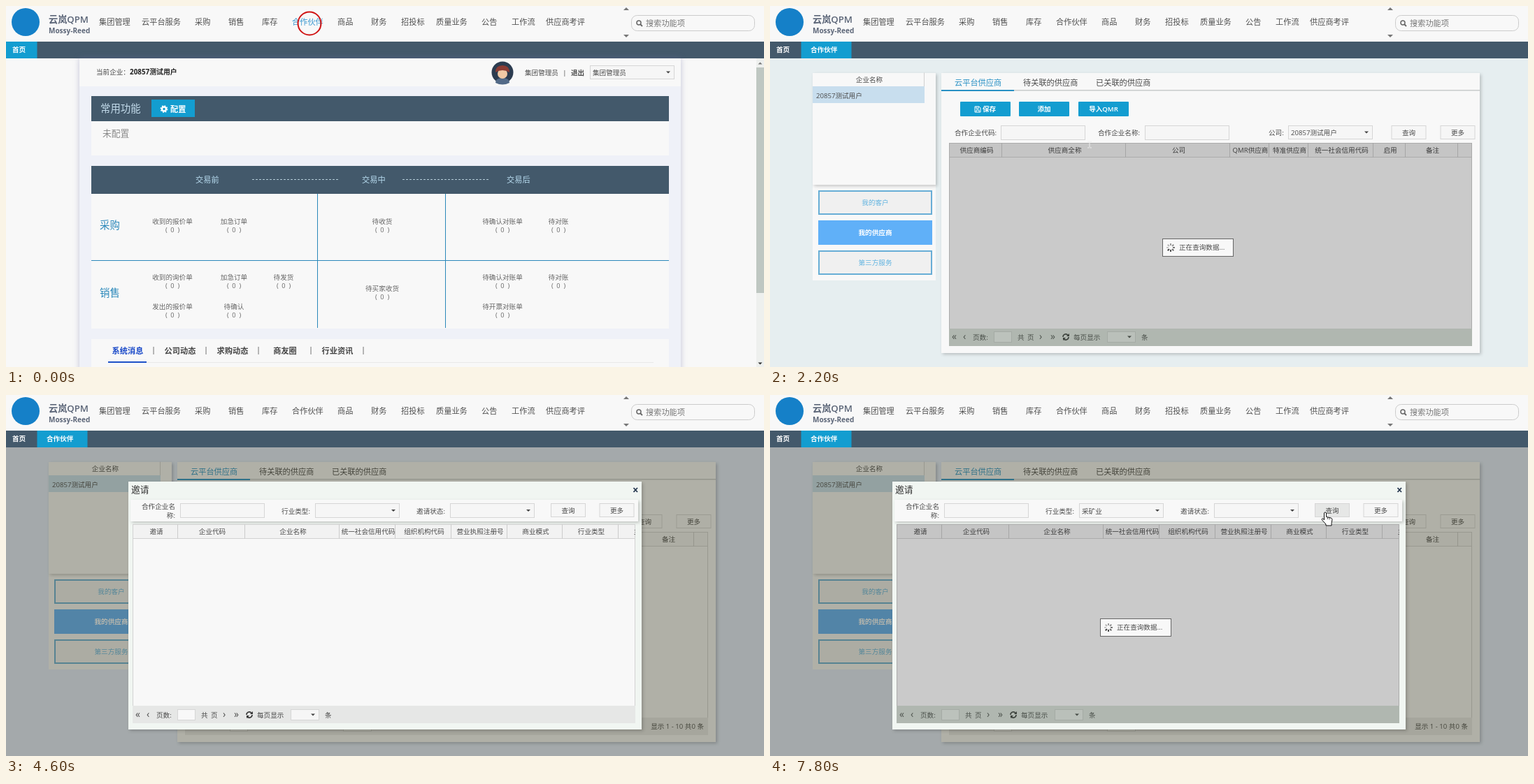
Write an HTML page that moves like this. It is 1084x517 px and loops after 8 s.

```html
<!DOCTYPE html>
<html lang="zh-CN">
<head>
<meta charset="utf-8">
<style>
html, body { margin: 0; height: 100%; overflow: hidden; background: #f8f8f8 }
#stage { display: block; width: 100vw; height: 100vh; font-family: 'Open Sans', 'Noto Sans CJK SC', 'Noto Sans CJK', sans-serif }
.shadow { filter: drop-shadow(2px 2px 2px #0003) }
</style>
</head>
<body>
<svg id="stage" viewBox="0 0 1084 517"></svg>
<script>
const LOOP = 8000, STEP = 200;
const PAPER = '#f8f8f8', BAR = '#43596b', BLUE = '#139dd0', INK = '#4a4a4a';
const ACCOUNT = '20857测试用户';

const rect = (x, y, w, h, fill, extra = '') =>
  `<rect x="${x}" y="${y}" width="${w}" height="${h}" fill="${fill}" ${extra}/>`;
const box = (x, y, w, h, fill = '#f6f6f6', stroke = '#d6d6d6', width = 1, extra = '') =>
  rect(x + width / 2, y + width / 2, w - width, h - width, fill, `stroke="${stroke}" stroke-width="${width}" ${extra}`);
const path = (d, fill, extra = '') => `<path d="${d}" fill="${fill}" ${extra}/>`;
const line = (d, stroke, width = 1, extra = '') => path(d, 'none', `stroke="${stroke}" stroke-width="${width}" ${extra}`);
const circle = (x, y, r, fill, extra = '') => `<circle cx="${x}" cy="${y}" r="${r}" fill="${fill}" ${extra}/>`;
const text = (x, y, s, size = 9.6, fill = INK, extra = '') =>
  `<text x="${x}" y="${y}" dy=".37em" font-size="${size}" fill="${fill}" ${extra}>${s}</text>`;
const MID = 'text-anchor="middle"', END = 'text-anchor="end"', BOLD = 'font-weight="600"';
const mid = (x, y, s, size, fill, extra = '') => text(x, y, s, size, fill, MID + ' ' + extra);
const group = (id, ...parts) => `<g id="${id}">${parts.join('')}</g>`;
const caret = (x, y, fill = '#444', dir = 1, r = 3) =>
  path(`M${x - r} ${y - dir * r / 2}h${2 * r}l${-r} ${dir * r}z`, fill);
const select = (x, y, w, h, s = '') => box(x, y, w, h) + text(x + 4, y + h / 2, s) + caret(x + w - 9, y + h / 2);
const button = (x, y, s) => box(x, y, 50, 20) + mid(x + 25, y + 10, s);
const solid = (x, s) => rect(x, 137, 72, 21, BLUE, 'rx="1"') + mid(x + 36, 147.5, s, 9.6, '#fff', BOLD);

function scrollbar(x, y, w, h, thumb) {
  return rect(x, y, w, h, '#eef0ee') + rect(x, y + 13, w, thumb, '#bfc7c2') +
    caret(x + w / 2, y + 7, '#777', -1) + caret(x + w / 2, y + h - 5, '#333');
}

function grid(x, y, w, h, cols, labels) {
  let out = box(x, y, w, h, PAPER, '#d2d2d2') + box(x, y, w, 21, '#f2f2f2', '#d2d2d2');
  labels.forEach((label, i) => {
    out += mid((cols[i] + cols[i + 1]) / 2 + 2, y + 10, label);
    out += line(`M${cols[i + 1] + .5} ${y}v21`, '#ccc');
  });
  return out + rect(x, y + h - 25, w, 25, '#e6e7e6');
}

const pager = (x, y) =>
  text(x + 4, y - 1, '«', 14) + text(x + 20, y - 1, '‹', 14) + text(x + 34, y, '页数:') +
  box(x + 64, y - 8, 26, 16, PAPER) + text(x + 129, y - 1, '›', 14) + text(x + 145, y - 1, '»', 14) +
  line(`M${x + 163} ${y}a4 4 0 0 1 7.5 -2m.5 2a4 4 0 0 1 -7.5 2`, '#333', 1.6) +
  path(`M${x + 172} ${y - 5}v4h-4zM${x + 163} ${y + 5}v-4h4z`, '#333') +
  text(x + 178, y, '每页显示') + select(x + 226, y - 8, 41, 16) + text(x + 275, y, '条');

function loading(id, x, y, w, h, mx, my) {
  let dots = '';
  for (let i = 0; i < 8; i++)
    dots += `<path d="M0 -3v-3" stroke="#333" stroke-width="2" opacity="${.25 + i * .1}" transform="rotate(${i * 45})"/>`;
  return group(id, rect(x, y, w, h, '#000', 'opacity=".19"'), rect(x, y + h - 25, w, 25, '#80a080', 'opacity=".2"'),
    box(mx, my, 102, 26, PAPER, '#666'), text(mx + 24, my + 12, '正在查询数据...'),
    `<g transform="translate(${mx + 12} ${my + 13})"><g class="spin">${dots}</g></g>`);
}

function header() {
  const nav = { 集团管理: 133, 云平台服务: 194, 采购: 270, 销售: 318, 库存: 366, 合作伙伴: 409, 商品: 474,
    财务: 522, 招投标: 565, 质量业务: 615, 公告: 680, 工作流: 723, 供应商考评: 772 };
  return rect(0, 0, 1084, 51, PAPER) + circle(28, 23, 20, '#1580c8') +
    text(61, 19, '云岚QPM', 13.2, '#5c6678', BOLD) + text(61, 35.5, 'Mossy-Reed', 10, '#5c6678', 'font-weight="700"') +
    Object.entries(nav).map(([s, x]) => text(x, 23, s, 11.2, '#505050', s === '合作伙伴' ? 'id="partner"' : '')).join('') +
    caret(887, 4, '#777', -1, 4) + caret(887, 43, '#777', 1, 4) + box(894, 13, 177, 23, PAPER, '#ccc', 1, 'rx="8"') +
    circle(905, 24, 3, 'none', 'stroke="#666" stroke-width="1.5"') + line('M907 26l3 3', '#666', 1.8) +
    text(915, 24.5, '搜索功能项', 11.2, '#777') + rect(0, 51, 1084, 24, BAR);
}

function home() {
  const counts = [
    [238, 308, '收到的报价单'], [326, 308, '加急订单'], [538, 308, '待收货'], [710, 308, '待确认对账单'], [790, 308, '待对账'],
    [238, 388, '收到的询价单'], [326, 388, '加急订单'], [397, 388, '待发货'], [538, 404, '待买家收货'],
    [710, 388, '待确认对账单'], [790, 388, '待对账'],
    [238, 430, '发出的报价单'], [326, 430, '待确认'], [710, 430, '待开票对账单']];
  const news = { 系统消息: 174, 公司动态: 249, 求购动态: 324, 商友圈: 399, 行业资讯: 474 };
  return rect(0, 75, 1084, 442, PAPER) +
    rect(105, 75, 860, 450, '#eff1f8', 'style="filter:drop-shadow(0 0 4px #6668a060)"') +
    rect(105, 75, 860, 40, PAPER) + rect(0, 51, 44.5, 24, BLUE) + text(9, 62.5, '首页', 9.6, '#fff', BOLD) +
    text(129, 94, '当前企业：') + text(177, 94, ACCOUNT, 9.9, '#222', 'font-weight="700"') +
    circle(710, 95, 15.5, '#2c3c50') + path('M700 110q0-7 10-7t10 7q-10 5-20 0z', '#526a88') +
    circle(710, 97, 7, '#f0c8a4') + path('M700 95q0-10 10-10t10 10q-10-6-20 0z', '#8c3c34') +
    text(742, 95, '集团管理员') + mid(799, 95, '|') + text(808, 95, '退出', 9.6, INK, BOLD) + select(835, 85, 121, 20, '集团管理员') +
    rect(122, 129, 826, 85, PAPER) + rect(122, 129, 826, 36, BAR) + text(135, 147, '常用功能', 14.4, '#c4dcec') +
    rect(208, 134, 62, 25, BLUE) + circle(226, 147.5, 3, 'none', 'stroke="#fff" stroke-width="2.5"') +
    circle(226, 147.5, 4.6, 'none', 'stroke="#fff" stroke-width="1.6" stroke-dasharray="1.8 1.8"') +
    text(235, 147.5, '配置', 11.2, '#fff', BOLD) + text(138, 182.5, '未配置', 12.8, '#888') +
    rect(122, 229, 826, 233, PAPER) + rect(122, 229, 826, 40, BAR) +
    [['交易前', 271], ['交易中', 509], ['交易后', 716]].map(([s, x]) => text(x, 249, s, 11.2, '#b8dcf0')).join('') +
    line('M352 248.5h124M567 248.5h125', '#b4ccd8', 1, 'stroke-dasharray="3 2"') +
    line('M445.5 269v192M628.5 269v192M122 364.5h826', '#2a88ba') +
    text(134, 314, '采购', 14.4, '#2a88ba') + text(134, 411, '销售', 14.4, '#2a88ba') +
    counts.map(([x, y, s]) => mid(x, y, s, 9.6, '#666') + mid(x, y + 13, '(&#160; 0 &#160;)', 9.2, '#666')).join('') +
    rect(122, 477, 826, 40, PAPER) + line('M146 510.5h780', '#e8e8e8') + rect(146, 509, 55, 2, '#1c50c8') +
    Object.entries(news).map(([s, x], i) => mid(x, 493.5, s, 11.2, i ? '#444' : '#1848c8', BOLD) + mid(x + 37, 492, '|', 11)).join('') +
    scrollbar(1073, 75, 11, 442, 323);
}

function menu() {
  const columns = [
    [409, '供应商分类管理', '供应商分类定义', '供应商分类变更申请查询', '供应商分类变更申请', '供应商分类变更审核', '合作伙伴'],
    [545, '发布调查表', '调查表附件模版定义', '调查表创建', '调查表审批', '我发出的调查表'],
    [661, '供应商生命周期管理', '供应商生命周期管理', '供应商账号', '供应商信息查询', '供货能力清单定义',
      '供货能力评审', '供货能力清单查询', '合格供应商评分要素定义'],
    [797, '填写调查表', '调查表维护', '我收到的调查表']];
  return rect(401, 51, 501, 203, '#18304e') + path('M431 45l7 6h-14z', '#18304e') +
    columns.map(([x, title, ...items]) => text(x, 71, title, 11.2, '#f0f4f8') + items.map((s, i) => {
      const y = 99.5 + i * 21.55;
      return path(`M${x + 3} ${y - 3}l3.5 3l-3.5 3z`, '#fff') +
        text(x + 10.7, y, s, 9.6, '#f0f4f8', s === '合作伙伴' ? 'id="choice"' : '');
    }).join('')).join('');
}

function partners() {
  const side = (y, s, on) => box(69, y, 163, 35, on ? '#60b0f8' : '#f0f0f0', on ? '#60b0f8' : '#68aed6', 2) +
    mid(150.5, y + 17.5, s, 9.6, on ? '#fff' : '#62b4e0', on ? BOLD : '');
  return rect(0, 75, 1084, 442, '#e6eef0') + text(9, 62.5, '首页', 9.6, '#fff', BOLD) +
    rect(44.5, 51, 72, 24, BLUE) + text(58, 62.5, '合作伙伴', 9.6, '#fff', BOLD) +
    rect(61, 256, 176, 137, PAPER) + rect(61, 96, 176, 160, PAPER, 'class="shadow"') +
    mid(142, 105, '企业名称') + line('M61 115.5h159.5v-20', '#d0d0d0') +
    rect(61, 115, 160, 24, '#c8deee') + text(66, 128, ACCOUNT) +
    side(264, '我的客户') + side(307, '我的供应商', true) + side(350, '第三方服务') +
    rect(245, 96, 770, 401, PAPER, 'class="shadow"') + rect(245, 120, 770, 1.5, '#c8cccc') + rect(245, 120, 104, 2, '#2890c4') +
    text(264, 109.5, '云平台供应商', 11.2, '#2890c4') + text(362, 109.5, '待关联的供应商', 11.2) + text(466, 109.5, '已关联的供应商', 11.2) +
    solid(272, '') + text(304, 147.5, '保存', 9.6, '#fff', BOLD) +
    line('M293 144h6l2 2v6h-8zM295 144v3h3v-3M295 152v-3h4v3', '#fff') +
    group('add', solid(356, '添加')) + solid(441, '导入QMR') +
    text(264, 181.5, '合作企业代码:') + box(330, 171, 121, 21) + text(469, 181.5, '合作企业名称:') + box(536, 171, 121, 21) +
    text(713, 181.5, '公司:') + select(741, 171, 121, 20, ACCOUNT) + button(888.5, 171, '查询') + button(958.5, 171, '更多') +
    grid(256, 196, 748, 291, [256, 331, 508, 657, 713, 769, 862, 908, 983],
      ['供应商编码', '供应商全称', '公司', 'QMR供应商', '特准供应商', '统一社会信用代码', '启用', '备注']) +
    pager(256, 474) + group('blank', text(354, 474, '共'), text(368, 474, '页')) +
    group('loaded', mid(332, 474, '1'), text(354, 474, '共1页'), text(490, 474, '10'), text(998, 474, '显示 1 - 10 共0 条', 9.6, INK, END)) +
    loading('pageLoad', 256, 196, 748, 291, 561, 333);
}

function dialog() {
  const label = (x, y, s) => text(x, y, s, 9.6, INK, END);
  const warm = (x, w, h) => rect(x, 96, w, h, '#b0b070', 'opacity=".13"');
  return rect(0, 75, 1084, 442, '#000', 'opacity=".29"') + warm(61, 176, 297) + warm(245, 770, 401) +
    rect(175, 124, 734, 355, '#f1f6f2', 'class="shadow"') +
    text(179, 135.5, '邀请', 12.8, '#333') + line('M897.5 133l5.5 6m0-6l-5.5 6', '#24364e', 1.8) +
    rect(178, 150, 726, 31, PAPER, 'class="shadow"') +
    label(242, 159.5, '合作企业名') + label(242, 172, '称:') + box(249, 155, 121, 21) +
    label(435, 166, '行业类型:') + select(442, 155, 121, 21) + group('picked', text(446, 166, '采矿业')) +
    label(628, 166, '邀请状态:') + select(635, 155, 121, 21) +
    button(779, 155, '查询') + group('queryHover', rect(780, 156, 48, 18, '#e6e7e6'), mid(804, 165, '查询')) + button(848.5, 155, '更多') +
    // the nested viewport clips the last column
    '<svg width="900" height="517">' + grid(181, 185, 719, 285, [181, 245, 341, 476, 556, 636, 716, 795, 875, 955],
      ['邀请', '企业代码', '企业名称', '统一社会信用代码', '组织机构代码', '营业执照注册号', '商业模式', '行业类型', '主营业务']) + '</svg>' +
    pager(181, 458) + text(279, 458, '共') + text(293, 458, '页') + loading('dialogLoad', 181, 185, 719, 285, 472, 320);
}

function industries() {
  const names = ['农、林、牧、渔业', '采矿业', '电力、热力、燃气及水生产和...', '房地产业', '公共管理、社会保障和社会组织',
    '国际组织', '建筑业', '交通运输、仓储和邮政业', '教育'];
  return box(442, 155, 121, 21, '#f6f6f6', '#3a9ed2', 1.6) + caret(554, 165.5, '#6a9cb8') +
    rect(442, 177, 157, 158, '#e6eef0', 'stroke="#bcc4c8" class="shadow"') + rect(443, 178, 143, 15.5, '#cae1f2') +
    names.map((s, i) => text(446, 185 + i * 17.55, s)).join('') + scrollbar(586.5, 177, 11, 157, 59);
}

const pointers =
  group('hand', path('M-1.5 11V1a1.6 1.6 0 0 1 3 0v5.5l6.5 1.5q2 .6 2 2.5l-1 5v3.5h-8v-2l-5.5-6q-1-2 1-2.5z', '#fff',
    'stroke="#111" stroke-linejoin="round"'), line('M3.5 7v3M6 7.5v3', '#333', .8)) +
  group('arrow', path('M0 0v14l3.2-3l2.3 5l2-1l-2.3-5h4.8z', '#fff', 'stroke="#111"')) +
  group('beam', line('M0 6h2.5m1 0h2.5M3 6.5v8M0 15h2.5m1 0h2.5', '#eee'));

const stage = document.getElementById('stage');
stage.innerHTML = header() + group('homePage', home()) + group('navMenu', menu()) +
  group('ring', circle(434, 25, 16.5, 'none', 'stroke="#d01414" stroke-width="2"')) +
  group('partnerPage', partners()) + group('invite', dialog()) + group('industryList', industries()) + group('pointer', pointers);

// time, x, y, and the pointer shape used from that time on
const route = [
  [1000, 434, 60, 'arrow'], [1400, 454, 187, 'hand'], [2000, 454, 188, 'beam'], [2800, 454, 188, 'arrow'],
  [3400, 416, 150, 'hand'], [4000, 416, 150, ''], [5000, 500, 190, 'arrow'], [5400, 552, 162, 'hand'],
  [5800, 502, 197, 'hand'], [6400, 502, 197, 'arrow'], [7200, 794, 168, 'hand'], [LOOP, 794, 168, 'hand']];
const find = id => document.getElementById(id);
const show = (id, on) => find(id).style.display = on ? '' : 'none';

function movePointer(t) {
  const i = route.findIndex(stop => stop[0] > t) - 1;
  const shape = i < 0 ? '' : route[i][3];
  for (const id of ['hand', 'arrow', 'beam']) show(id, id === shape);
  if (!shape) return;
  const [a, x, y] = route[i], [b, x2, y2] = route[i + 1];
  const p = (t - a) / (b - a), k = p * p * (3 - 2 * p);
  find('pointer').setAttribute('transform', `translate(${x + (x2 - x) * k} ${y + (y2 - y) * k})`);
}

function draw(now) {
  const t = Math.floor(now % LOOP / STEP) * STEP;
  const within = (a, b) => t >= a && t < b;
  show('homePage', t < 2000);
  show('ring', t < 800);
  show('navMenu', within(800, 2000));
  show('partnerPage', t >= 2000);
  show('pageLoad', within(2000, 2800));
  show('blank', t < 2800);
  show('loaded', t >= 2800);
  show('invite', t >= 4000);
  show('industryList', within(5400, 6400));
  show('picked', t >= 6400);
  show('queryHover', t >= 7200);
  show('dialogLoad', t >= 7600);
  find('partner').setAttribute('fill', t < 800 ? '#3a98d0' : '#505050');
  find('choice').setAttribute('fill', within(1400, 2000) ? '#48b0f0' : '#f0f4f8');
  find('add').firstChild.setAttribute('fill', within(3400, 4000) ? '#2ab6de' : BLUE);
  for (const dots of document.querySelectorAll('.spin')) dots.setAttribute('transform', `rotate(${t / STEP * 90})`);
  movePointer(t);
  requestAnimationFrame(draw);
}
requestAnimationFrame(draw);
</script>
</body>
</html>
```
